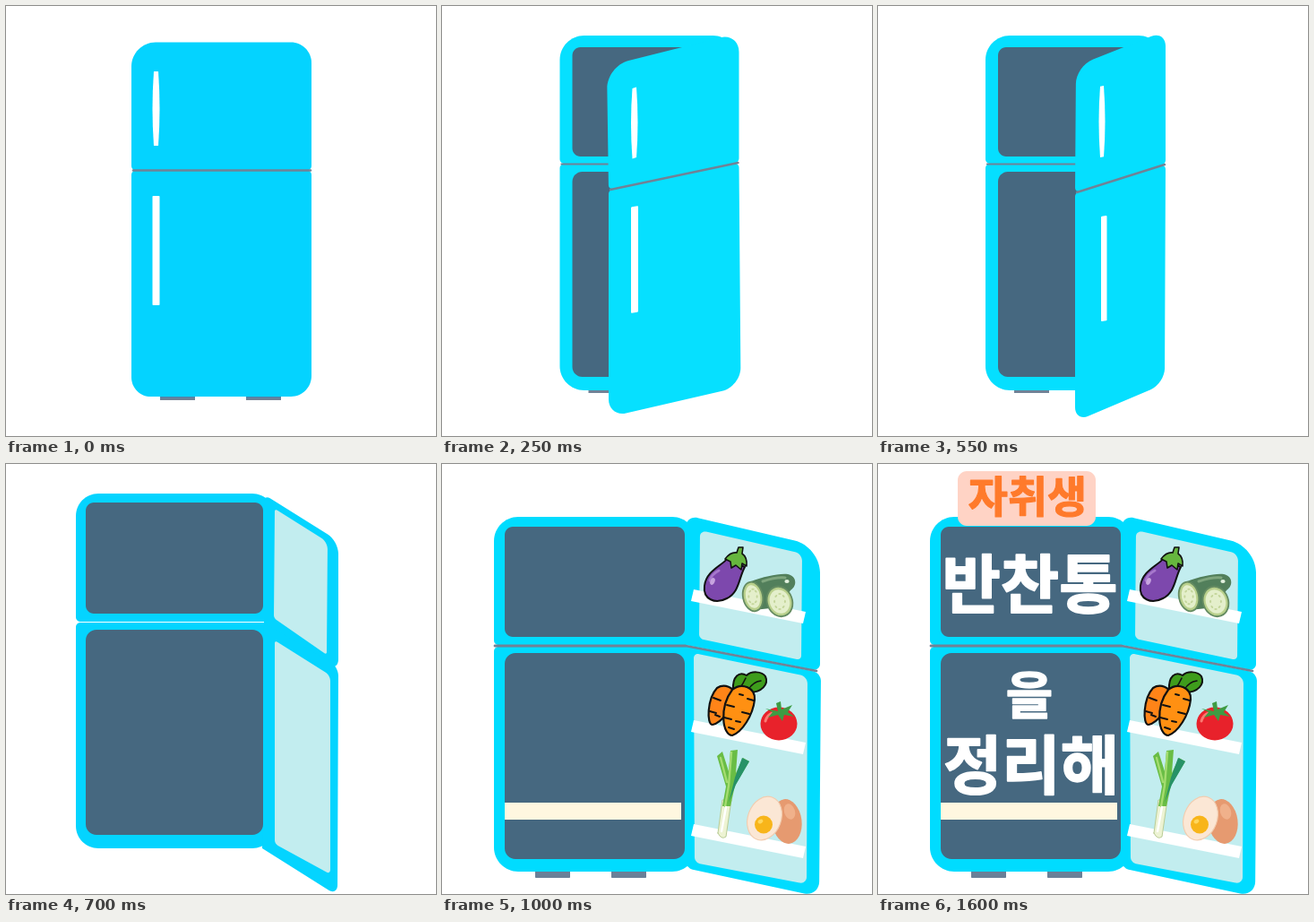
An HTML page with a canvas that plays this animation: 480 by 480 pixels, repeating every 2200 ms.

```html
<!DOCTYPE html>
<html lang="ko">
<head>
<meta charset="utf-8">
<style>
html, body { margin: 0; width: 100%; height: 100%; overflow: hidden; background: #fff; }
canvas { display: block; width: 100vw; height: 100vh; }
</style>
</head>
<body>
<canvas id="stage" width="480" height="480"></canvas>
<script>
const ctx = document.getElementById('stage').getContext('2d');
const LOOP = 2200;
const INSIDE = '#466880', PANEL = '#c2edef', SEAM = '#718296', INK = '#111';

// Polygon of [x, y, cut] corners, each rounded by its cut length.
function poly(color, pts) {
  const n = pts.length;
  const toward = (a, b, d) => {
    const len = Math.hypot(b[0] - a[0], b[1] - a[1]) || 1;
    return [a[0] + (b[0] - a[0]) * d / len, a[1] + (b[1] - a[1]) * d / len];
  };
  ctx.beginPath();
  pts.forEach((p, i) => {
    const r = p[2] || 0, prev = pts[(i + n - 1) % n], next = pts[(i + 1) % n];
    ctx.lineTo(...toward(p, prev, r));
    if (r) ctx.bezierCurveTo(...toward(p, prev, r * .45), ...toward(p, next, r * .45), ...toward(p, next, r));
  });
  ctx.closePath();
  ctx.fillStyle = color;
  ctx.fill();
}

function box(color, x0, y0, x1, y1, r = 0, rb = r) {
  poly(color, [[x0, y0, r], [x1, y0, r], [x1, y1, rb], [x0, y1, rb]]);
}

function line(color, width, ...p) {
  ctx.beginPath();
  for (let i = 0; i < p.length; i += 2) ctx.lineTo(p[i], p[i + 1]);
  ctx.strokeStyle = color;
  ctx.lineWidth = width;
  ctx.stroke();
}

function oval(color, x, y, rx, ry, turn = 0, edge, width = 2) {
  ctx.beginPath();
  ctx.ellipse(x, y, rx, ry, turn, 0, 7);
  paint(color, edge, width);
}

function shape(d, color, edge, width = 2) {
  const p = new Path2D(d);
  paint(color, edge, width, p);
}

function paint(color, edge, width, path) {
  const arg = path ? [path] : [];
  if (color) { ctx.fillStyle = color; ctx.fill(...arg); }
  if (edge) { ctx.strokeStyle = edge; ctx.lineWidth = width; ctx.stroke(...arg); }
}

function label(text, x, y, size, color) {
  ctx.font = `900 ${size}px "Noto Sans CJK KR", "Noto Sans CJK", sans-serif`;
  ctx.textAlign = 'center';
  ctx.fillStyle = ctx.strokeStyle = color;
  ctx.lineWidth = size / 40;
  ctx.fillText(text, x, y);
  ctx.strokeText(text, x, y);
}

// Front door: left and right x, then left/right y of top, seam and bottom.
function frontDoor(s) {
  const [xl, xr, tl, tr, sl, sr, bl, br] = s.door, r = s.r, bend = s.bend;
  poly(s.color, [[xl, tl, r], [xr, tr, r * .85], [xr, sr, 5], [xl + bend, sl, 5]]);
  poly(s.color, [[xl + bend, sl, 5], [xr, sr, 5], [xr + bend, br, r * .85], [xl + bend, bl, r * .8]]);
  line(SEAM, 2.4, xl + bend + 2, sl, xr - 1, sr);
  const [x0, y0, x1, y1] = s.grip;
  shape(`M${x0 + 1.5} ${y0 + s.tilt}Q${x0 - 1.5} ${(y0 + y1) / 2} ${x0 + 1.5} ${y1}L${x1 - 1.5} ${y1 - s.tilt}
    Q${x1 + 1.5} ${(y0 + y1) / 2} ${x1 - 1.5} ${y0}Z`, '#fff');
  const [a, b, c, d] = s.bar;
  poly('#fff', [[a, b + s.tilt, 1], [c, b, 1], [c, d - s.tilt, 1], [a, d, 1]]);
}

function closedFridge(s) {
  const x = s.x, y = s.y;
  if (s.open) {
    if (s.foot) box(SEAM, x + 32, y + 395, x + 71, y + 399);
    box(s.color, x, y, x + 198, y + 143, 27, 5);
    box(s.color, x, y + 143, x + 198, y + 396, 5, 27);
    box(INSIDE, x + 14, y + 13, x + 186, y + 135, 9);
    box(INSIDE, x + 14, y + 152, x + 186, y + 381, 11);
    line(SEAM, 2.2, x + 2, y + 143.5, x + 190, y + 143.5);
  } else {
    for (const dx of [32, 128]) {
      box('#4e86ac', x + dx, y + 395, x + dx + 39, y + 398);
      box(SEAM, x + dx, y + 397, x + dx + 39, y + 399.5);
    }
  }
  frontDoor(s);
}

function eggplant() {
  shape('M318 106C313 113 295 119 293 136C291 151 305 157 318 150C332 143 331 128 338 115Z', '#7d48ad', INK);
  shape('M299 130Q301 123 309 119', null, '#a678cc', 3);
  oval('#c7a4df', 302, 131, 2.5, 4, .4);
  shape('M329 99L331 93L336 93L335 100Q341 104 340 114L335 111L334 118L328 113L323 116L322 109L316 106Q322 98 329 99Z', '#66b63e', INK, 1.6);
}

function slice(x, y, rx, ry, turn) {
  oval('#b9d08c', x, y, rx, ry, turn, '#648b61', 1.8);
  oval('#e4efcb', x, y, rx - 3, ry - 3.5, turn);
  for (let i = 0; i < 8; i++) {
    const a = i * Math.PI / 4;
    oval('#c3d59a', x + Math.cos(a) * rx * .42, y + Math.sin(a) * ry * .5, 1, 1.7, a);
  }
}

function cucumber() {
  shape('M345 131C359 126 375 122 386 123C396 125 397 136 389 141L376 160L348 163Z', '#527f5b');
  shape('M358 131Q373 126 383 127', null, '#7fa67e', 3);
  oval('#e3f1df', 385, 131, 2.6, 2);
  slice(347, 148, 11, 16.5, -.2);
  slice(377, 153.5, 14, 17, -.35);
}

function carrots() {
  shape('M325 252C324 237 332 231 340 236C345 231 357 231 361 237C365 246 357 255 343 255Z', '#3e9d1c', INK);
  shape('M331 252Q336 246 339 239M342 252Q347 243 356 242', null, INK, 1.6);
  shape('M307 250C315 245 327 249 326 258C324 273 312 289 302 291C295 291 296 262 307 250Z', '#ff8418', INK, 2.2);
  shape('M324 252C335 243 350 250 349 263C347 281 335 299 324 303C313 303 309 272 324 252Z', '#ff9012', INK, 2.2);
  shape('M303 261l8 3M299 276l7 2M310 282l-5 -2M318 269l8 2M341 262l7 2M315 283l8 2M343 279l-8 -2M320 294l6 2M332 257l4 1M333 288l-5 -1', null, INK, 2);
}

function tomato() {
  oval('#e8222b', 376, 290, 20.5, 18.5);
  shape('M361 287Q363 280 369 278', null, '#fa7a72', 3);
  shape('M375 276L373 267L378 265L379 274L391 269L386 277L393 282L382 280L380 287L375 280L364 283L369 277L361 273Z', '#3e9b43');
}

function leek() {
  shape('M308 412L313 375L323 375L317 416Q312 420 308 412Z', '#edf3d3', '#b9cc95', 1);
  shape('M313 382L317 360L307 326L313 321L320 343L322 320L330 319L328 345L336 328L343 332L327 359L322 382Z', '#69bd45');
  shape('M320 378L327 350L335 328L343 332L328 358Z', '#279267');
  shape('M316 382L320 359L323 322M318 355L311 328', null, '#a4dc70', 2.4);
  shape('M312 410L317 383', null, '#fff', 2.5);
}

function eggs() {
  oval('#e69a70', 385, 399, 16.5, 25, -.13);
  oval('#f0b18b', 388, 388, 6, 9, -.3);
  oval('#fbe7d5', 360, 395.5, 18.5, 25, .35, '#f2cdb0', 1.2);
  oval('#f8b51a', 359, 402.5, 10, 10);
  oval('#ffd75d', 355.5, 399, 3, 2.2, -.5);
}

// Each food: its place on the wide door, then on the narrow one (x, y, w, h).
const foods = [
  [eggplant, [293, 92, 48, 62], [291, 74, 45, 59]],
  [cucumber, [335, 123, 59, 48], [316, 110, 51, 42]],
  [carrots, [296, 232, 67, 72], [290, 230, 66, 64]],
  [tomato, [356, 265, 41, 44], [327, 268, 35, 39]],
  [leek, [304, 319, 39, 99], [296, 309, 32, 82]],
  [eggs, [340, 370, 61, 54], [308, 360, 49, 44]]
];

function drawFoods(narrow) {
  for (const [draw, a, b] of foods) {
    ctx.save();
    if (narrow) {
      ctx.translate(b[0], b[1]);
      ctx.scale(b[2] / a[2], b[3] / a[3]);
      ctx.translate(-a[0], -a[1]);
    }
    draw();
    ctx.restore();
  }
}

function shelves(x0, x1, drop, h, tops) {
  for (const y of tops) poly('#fff', [[x0 + 2, y], [x1, y + drop], [x1 - 3, y + drop + h], [x0 - 1, y + h]]);
}

function narrowFridge(full) {
  const c = '#04d4ff';
  if (full) for (const x of [130, 213]) box('#6a8098', x, 426, x + 39, 436, 1);
  box(c, 78, 33, 300, 176, 25, 5);
  box(c, 78, 177, 300, 429, 5, 25);
  poly(c, [[288, 34, 8], [371, 86, 14], [371, 232, 14], [288, 178]]);
  poly(c, [[288, 177], [371, 226, 10], [370, 482, 12], [286, 429]]);
  poly(PANEL, [[300, 50, 3], [359, 87, 8], [358, 213, 3], [299, 172, 3]]);
  poly(PANEL, [[300, 197, 3], [362, 236, 6], [362, 458, 5], [300, 424, 4]]);
  box(INSIDE, 89, 43, 287, 167, 9);
  box(INSIDE, 89, 185, 287, 414, 12);
  if (!full) return;
  line(SEAM, 2, 78, 176.5, 288, 176.5);
  box('#fff5e1', 89, 352, 283, 371);
  shelves(288, 367, 35, 12, [121, 278, 379]);
  drawFoods(true);
}

function wideFridge() {
  const c = '#00dcff';
  for (const x of [104, 189]) box('#6a8098', x, 453, x + 39, 462, 1);
  box(c, 58, 59, 284, 202, 27, 5);
  box(c, 58, 204, 284, 455, 5, 27);
  poly(c, [[272, 57, 14], [422, 92, 29], [422, 231, 8], [272, 202]]);
  poly(c, [[272, 203], [423, 233, 9], [421, 483, 17], [272, 451, 8]]);
  poly(PANEL, [[288, 74, 7], [402, 100, 8], [401, 219, 5], [287, 195, 5]]);
  poly(PANEL, [[281, 211, 6], [408, 237, 8], [407, 469, 8], [282, 445, 6]]);
  box(INSIDE, 70, 70, 271, 193, 9);
  box(INSIDE, 70, 211, 271, 441, 12);
  line(SEAM, 2.8, 59, 203, 272, 203, 418, 231);
  box('#fff7e0', 70, 378, 267, 397);
  shelves(279, 406, 25, 13, [140, 286, 402]);
  drawFoods(false);
}

function badge() {
  box('#ffd3c5', 89, 8, 243, 69, 10);
  label('자취생', 167, 54, 48, '#ff7a2b');
}

function title() {
  label('반찬통', 169.5, 160, 71, '#fff');
  label('을', 169, 279, 57, '#fff');
  label('정리해', 171, 362, 71, '#fff');
}

const swing = [
  { at: 0, x: 140, y: 40.5, color: '#04d3ff', r: 27, bend: 0, tilt: 0,
    door: [140, 341, 40.5, 40.5, 183.5, 183.5, 436, 436],
    grip: [163.5, 73, 171.5, 156], bar: [163.5, 212, 171.5, 334] },
  { at: 100, x: 136, y: 34, open: true, foot: true, color: '#06dbff', r: 25, bend: 1, tilt: .8,
    door: [162, 336, 54, 33, 196, 177, 453, 428],
    grip: [188, 83, 196, 164], bar: [188, 219, 196, 339] },
  { at: 250, x: 131.5, y: 33, open: true, foot: true, color: '#06e0ff', r: 25, bend: 2, tilt: 1.5,
    door: [184, 331.5, 67, 30, 205, 175, 459, 425],
    grip: [211, 90.5, 218.5, 170.5], bar: [211, 223, 219, 343] },
  { at: 400, x: 125.5, y: 33, open: true, foot: true, color: '#05dfff', r: 23, bend: 1, tilt: 1.2,
    door: [203, 326.5, 67, 28.5, 207, 176, 461, 423],
    grip: [230, 90, 236.5, 169], bar: [231, 229, 238, 347] },
  { at: 550, x: 120, y: 33, open: true, foot: true, color: '#05dfff', r: 20, bend: -1, tilt: .8,
    door: [221, 321, 67, 27.5, 208, 177, 464, 421.5],
    grip: [246.5, 89, 253.5, 169], bar: [249, 234, 255.5, 352] }
];

function draw(t) {
  ctx.fillStyle = '#fff';
  ctx.fillRect(0, 0, 480, 480);
  ctx.lineJoin = ctx.lineCap = 'round';
  if (t < 700) return closedFridge(swing.filter(s => s.at <= t).pop());
  if (t < 1000) return narrowFridge(t >= 850);
  wideFridge();
  if (t >= 1150) badge();
  if (t >= 1600) title();
}

const start = performance.now();
function tick(now) {
  draw(Math.max(0, now - start) % LOOP);
  requestAnimationFrame(tick);
}
draw(0);
requestAnimationFrame(tick);
</script>
</body>
</html>
```
